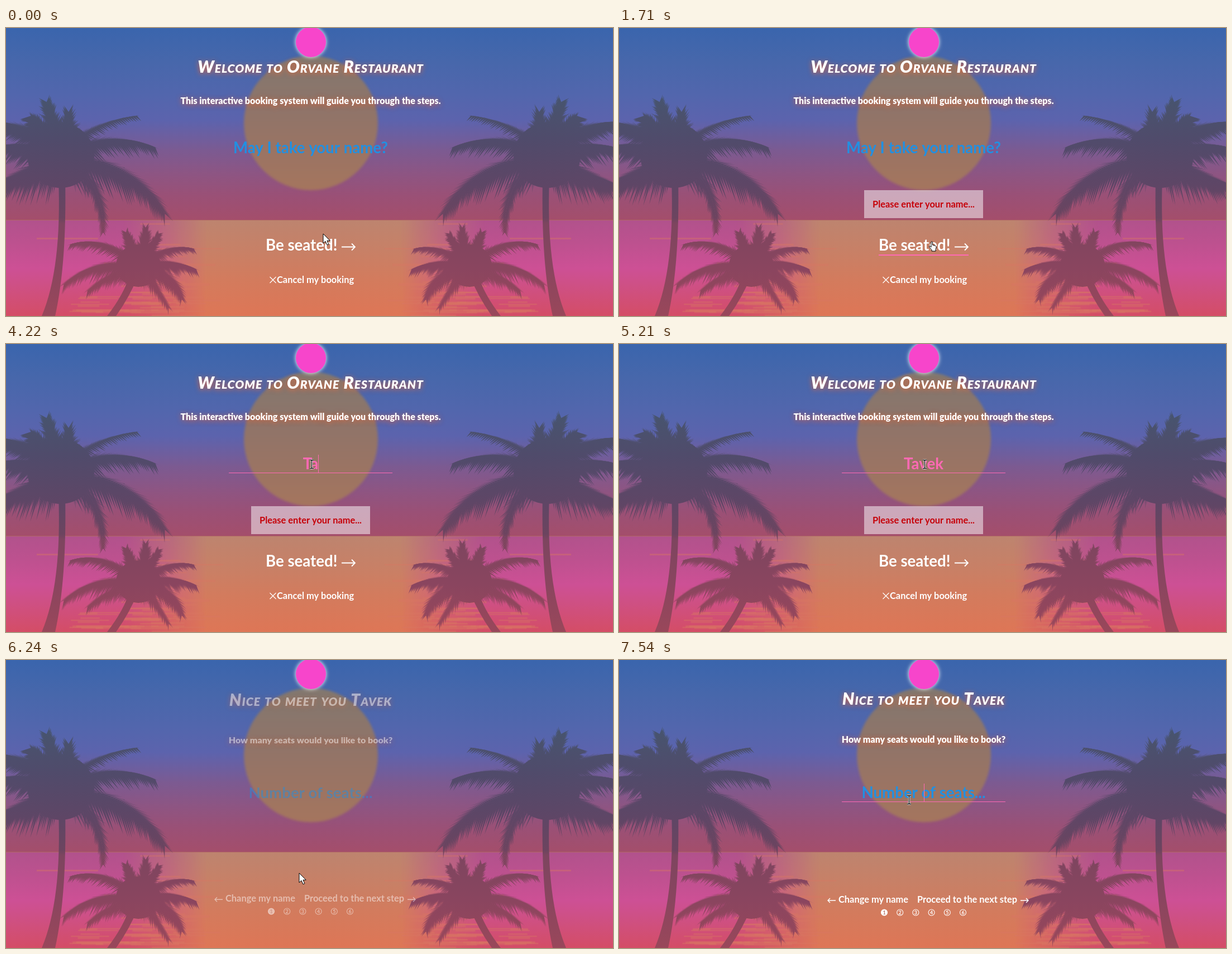
These frames come from a looping animation (1087 by 515 pixels, 8000 ms). An HTML page with a canvas:

```html
<!DOCTYPE html>
<html lang="en">
<head>
<meta charset="utf-8">
<title>Booking</title>
<style>
html, body { margin: 0; width: 100%; height: 100%; overflow: hidden; background: #3b67ae; }
canvas { display: block; }
</style>
</head>
<body>
<canvas id="stage" width="1087" height="515"></canvas>
<script>
const W = 1087, H = 515, LOOP = 8000, MID = 545.5;
const HORIZON = 343, MIRROR = 1067;
const PINK = '#ff69b4', BLUE = '#2190e2';
const GUEST = 'Tavek';
const KEYS = [3990, 4220, 4390, 4460, 4630];
const SWITCH = 6090;
const BIG = '700 27.6px Lato, sans-serif';
const SMALL = '700 16.4px Lato, sans-serif';
const HEAVY = '900 16px Lato, sans-serif';
const TITLE = 'italic small-caps 900 30px Lato, sans-serif';

const view = document.getElementById('stage').getContext('2d');
const scene = document.createElement('canvas');
scene.width = W;
scene.height = H;

let seed = 7;
const rnd = () => (seed = seed * 16807 % 2147483647) / 2147483647;
const ramp = (t, a, b) => Math.min(1, Math.max(0, (t - a) / (b - a)));
const smooth = p => p * p * (3 - 2 * p);

// ---------- scenery, painted once ----------
const g = scene.getContext('2d');

function vertical(y0, y1, stops) {
  const grad = g.createLinearGradient(0, y0, 0, y1);
  for (const [y, color] of stops) grad.addColorStop((y - y0) / (y1 - y0), color);
  return grad;
}

// leaflets along a curved spine; the flatter the spine, the more they hang
function frond(x0, y0, cx, cy, x1, y1, len) {
  const n = 40, w = len * .08 + .7;
  for (let i = 0; i <= n; i++) {
    const t = i / n, u = 1 - t;
    const x = u * u * x0 + 2 * u * t * cx + t * t * x1;
    const y = u * u * y0 + 2 * u * t * cy + t * t * y1;
    const a = Math.atan2(u * (cy - y0) + t * (y1 - cy), u * (cx - x0) + t * (x1 - cx));
    const dx = w * Math.cos(a), dy = w * Math.sin(a);
    const sag = .55 * Math.abs(Math.cos(a));
    for (const side of [-1, 1]) {
      const b = a + side * (.85 - .4 * t);
      const l = len * (1 - .55 * t) * (.7 + .5 * rnd());
      g.beginPath();
      g.moveTo(x - dx, y - dy);
      g.lineTo(x + l * Math.cos(b), y + l * (Math.sin(b) + sag));
      g.lineTo(x + dx, y + dy);
      g.fill();
    }
  }
}

function palm(x, y, rx, ry, trunk, fronds) {
  g.fill(new Path2D(trunk));
  g.beginPath();
  g.ellipse(x, y, rx, ry, 0, 0, 7);
  g.fill();
  for (const f of fronds) frond(x, y, ...f);
}

function shore() {
  g.fillStyle = 'rgba(215,118,98,.4)';
  g.fillRect(55, 375, 110, 3);
  for (let i = 0; i < 50; i++) {
    const y = 348 + 165 * Math.sqrt(rnd());
    const spread = 70 + (y - HORIZON) * .9;
    g.fillRect(310 - spread * rnd(), y, 30 + 80 * rnd(), 2 + 2 * rnd());
  }
  g.fillStyle = vertical(110, H, [
    [110, '#45566f'], [200, '#504b6b'], [280, '#5e4666'], [340, '#6c445f'],
    [350, '#7d455f'], [430, '#8a455f'], [H, '#99475a']]);
  palm(98, 228, 60, 58, 'M94 270Q100 430 64 515H88Q109 420 106 270Z', [
    [85, 170, 74, 136, 42], [65, 175, 48, 160, 46], [112, 185, 112, 154, 40],
    [45, 165, -28, 168, 46], [145, 168, 232, 157, 24], [180, 178, 264, 212, 40],
    [225, 235, 282, 328, 52], [175, 268, 174, 362, 34], [40, 195, -30, 215, 46],
    [40, 255, -30, 280, 54]]);
  palm(237, 425, 40, 38, 'M222 440Q212 475 181 515H197Q222 480 238 440Z', [
    [250, 385, 250, 360, 28], [222, 385, 216, 368, 28], [262, 390, 272, 370, 26],
    [180, 368, 118, 386, 26], [285, 383, 334, 394, 22], [290, 408, 338, 430, 30],
    [160, 408, 106, 456, 32], [185, 435, 148, 468, 26], [300, 430, 314, 482, 32],
    [262, 448, 290, 498, 24]]);
}

function paintScene() {
  g.fillStyle = vertical(0, HORIZON, [
    [0, '#3a65ad'], [60, '#4767ab'], [120, '#5266ad'], [165, '#5c63ad'], [190, '#6b5fa1'],
    [220, '#7c5a91'], [260, '#8d5583'], [300, '#9a5076'], [HORIZON, '#a44e6b']]);
  g.fillRect(0, 0, W, HORIZON);

  g.fillStyle = vertical(50, 290, [[50, '#82786f'], [150, '#907469'], [290, '#a5755e']]);
  g.filter = 'blur(2px)';
  g.beginPath();
  g.arc(546, 170, 120, 0, 7);
  g.fill();
  g.filter = 'none';

  g.fillStyle = vertical(HORIZON, H, [
    [HORIZON, '#b1528c'], [385, '#bd518f'], [430, '#cd5095'], [460, '#ce5085'], [H, '#d44d66']]);
  g.fillRect(0, HORIZON, W, H - HORIZON);

  // warm reflection with soft sides, masked on its own layer
  const layer = document.createElement('canvas');
  layer.width = W;
  layer.height = H;
  const r = layer.getContext('2d');
  r.fillStyle = vertical(HORIZON, H, [
    [HORIZON, '#bd846f'], [400, '#c88066'], [450, '#d37b5d'], [H, '#de7656']]);
  r.fillRect(0, HORIZON, W, H - HORIZON);
  const mask = r.createLinearGradient(210, 0, 857, 0);
  [[0, 0], [.11, .4], [.23, 1], [.77, 1], [.89, .4], [1, 0]]
    .forEach(([p, a]) => mask.addColorStop(p, `rgba(0,0,0,${a})`));
  r.globalCompositeOperation = 'destination-in';
  r.fillStyle = mask;
  r.fillRect(0, 0, W, H);
  g.drawImage(layer, 0, 0);

  g.fillStyle = '#b06765';
  g.fillRect(0, HORIZON, W, 1);

  shore();
  seed = 7;
  g.setTransform(-1, 0, 0, 1, MIRROR, 0);
  shore();
  g.setTransform(1, 0, 0, 1, 0, 0);

  g.shadowColor = '#fff';
  g.shadowBlur = 7;
  g.fillStyle = '#f745cb';
  g.beginPath();
  g.arc(546, 25, 27, 0, 7);
  g.fill();
}

// ---------- interface ----------
function say(text, x, y, font, color = '#fff', align = 'center') {
  view.font = font;
  view.fillStyle = color;
  view.textAlign = align;
  view.fillText(text, x, y);
  return view.measureText(text).width;
}

function glow(text, y, font, spacing = 0) {
  view.save();
  view.letterSpacing = spacing + 'px';
  view.shadowColor = 'rgba(240,100,50,.85)';
  view.shadowBlur = 10;
  view.shadowOffsetY = 2;
  say(text, MID, y, font);
  view.restore();
}

function line(d, width = 1.4) {
  view.strokeStyle = '#fff';
  view.lineWidth = width;
  view.stroke(new Path2D(d));
}

function arrow(x, y, len, dir, head, width) {
  const tip = x + dir * len;
  line(`M${x} ${y}H${tip}M${tip - dir * head} ${y - head}L${tip} ${y}L${tip - dir * head} ${y + head}`, width);
}

function field(top, caretX, caretOn) {
  view.fillStyle = PINK;
  view.fillRect(399, top + 32, 293, 1);
  if (caretOn) view.fillRect(caretX, top, 1, 33);
}

function namePage(t) {
  glow('Welcome to Orvane Restaurant', 80, TITLE, 1);
  glow('This interactive booking system will guide you through the steps.', 136, HEAVY);

  const typed = GUEST.slice(0, KEYS.filter(k => t >= k).length);
  const width = say(typed || 'May I take your name?', MID, 224, BIG, typed ? PINK : BLUE);
  const caretOn = t < 3410 || t >= 3900 && t < 5210 || t >= 5740;
  if (t >= 2840 && t < 5950) field(198, Math.round(MID + (typed ? width / 2 : 0)), caretOn);

  if (t >= 1710) {
    view.fillStyle = 'rgba(255,255,255,.5)';
    view.fillRect(439, 290, 213, 50);
    say('Please enter your name...', MID, 321, SMALL, '#c60008');
  }

  say('Be seated!', 465, 398, BIG, '#fff', 'left');
  arrow(601, 391.5, 24, 1, 6, 1.8);
  view.globalAlpha = ramp(t, 180, 450) - ramp(t, 2400, 2650) + ramp(t, 5600, 5850);
  view.fillStyle = PINK;
  view.fillRect(465, 405, 161, 2);
  view.globalAlpha = 1;

  line('M472.5 445l11 11m0-11l-11 11', 1.2);
  say('Cancel my booking', 485, 456, SMALL, '#fff', 'left');
}

function seatsPage(t) {
  const p = 1 - (1 - ramp(t, SWITCH, 6850)) ** 3;
  const scale = .98 + .02 * p;
  view.save();
  view.globalAlpha = p;
  view.setTransform(1, 0, 0, scale, 0, 257 * (1 - scale));
  glow('Nice to meet you ' + GUEST, 80, TITLE, 1);
  glow('How many seats would you like to book?', 148, HEAVY);
  say('Number of seats...', MID, 247, BIG, BLUE);
  if (t >= 7500) field(221, 546, true);

  arrow(388, 430, 14, -1, 4, 1.4);
  say('Change my name', 393, 434, SMALL, '#fff', 'left');
  say('Proceed to the next step', 534, 434, SMALL, '#fff', 'left');
  arrow(719, 430, 14, 1, 4, 1.4);

  for (let i = 0; i < 6; i++) {
    const x = 475 + 28.2 * i;
    view.beginPath();
    view.arc(x, 451.5, 5.5, 0, 7);
    view.strokeStyle = view.fillStyle = '#fff';
    view.lineWidth = 1.1;
    view.stroke();
    if (!i) view.fill();
    say(i + 1, x, 454.8, '700 9px Lato, sans-serif', i ? '#fff' : '#b9776c');
  }
  view.restore();
}

// ---------- pointer ----------
const MOVES = [
  [80, 568, 368], [550, 559, 381], [2360, 559, 381], [2670, 547, 215],
  [5300, 547, 215], [5800, 525, 381], [6550, 525, 381], [7150, 519, 250]];
const ARROW = new Path2D('M0 0V17L4 13.4L7 20L9.8 18.8L7 12.3H12.2Z');
const HAND = new Path2D('M4 1.5Q5.2 0 6.5 1.5V7L12 8.5Q13.5 9 13 12L12 15V18H5V15.5L.5 10.5Q.5 8.5 2 9L4 11Z');
const BEAM = new Path2D('M-3.5 -7.5H-1Q0 -7.5 0 -6Q0 -7.5 1 -7.5H3.5M0 -6V6M-3.5 7.5H-1Q0 7.5 0 6Q0 7.5 1 7.5H3.5');

function pointer(t) {
  let [, x, y] = MOVES[0];
  for (let i = 1; i < MOVES.length; i++) {
    const [a, x0, y0] = MOVES[i - 1], [b, x1, y1] = MOVES[i];
    if (t < a) break;
    const p = smooth(ramp(t, a, b));
    x = x0 + (x1 - x0) * p;
    y = y0 + (y1 - y0) * p;
  }
  x = Math.round(x);
  y = Math.round(y);
  const first = t < SWITCH, top = first ? 198 : 221;
  const stroke = (path, color, width) => {
    view.strokeStyle = color;
    view.lineWidth = width;
    view.stroke(path);
  };
  view.save();
  if (y >= top && y <= top + 33) {
    view.translate(x + .5, y);
    stroke(BEAM, '#fff', 3);
    stroke(BEAM, '#000', 1.3);
  } else {
    const hand = first && y > 370 && y < 407;
    const shape = hand ? HAND : ARROW;
    view.translate(x - (hand ? 4 : 0), y);
    view.fillStyle = '#fff';
    view.fill(shape);
    stroke(shape, '#000', 1);
  }
  view.restore();
}

function draw(now) {
  const t = now % LOOP;
  view.drawImage(scene, 0, 0);
  (t < SWITCH ? namePage : seatsPage)(t);
  pointer(t);
}

paintScene();
const start = performance.now();
function tick() {
  draw(performance.now() - start);
  requestAnimationFrame(tick);
}
tick();
</script>
</body>
</html>
```
